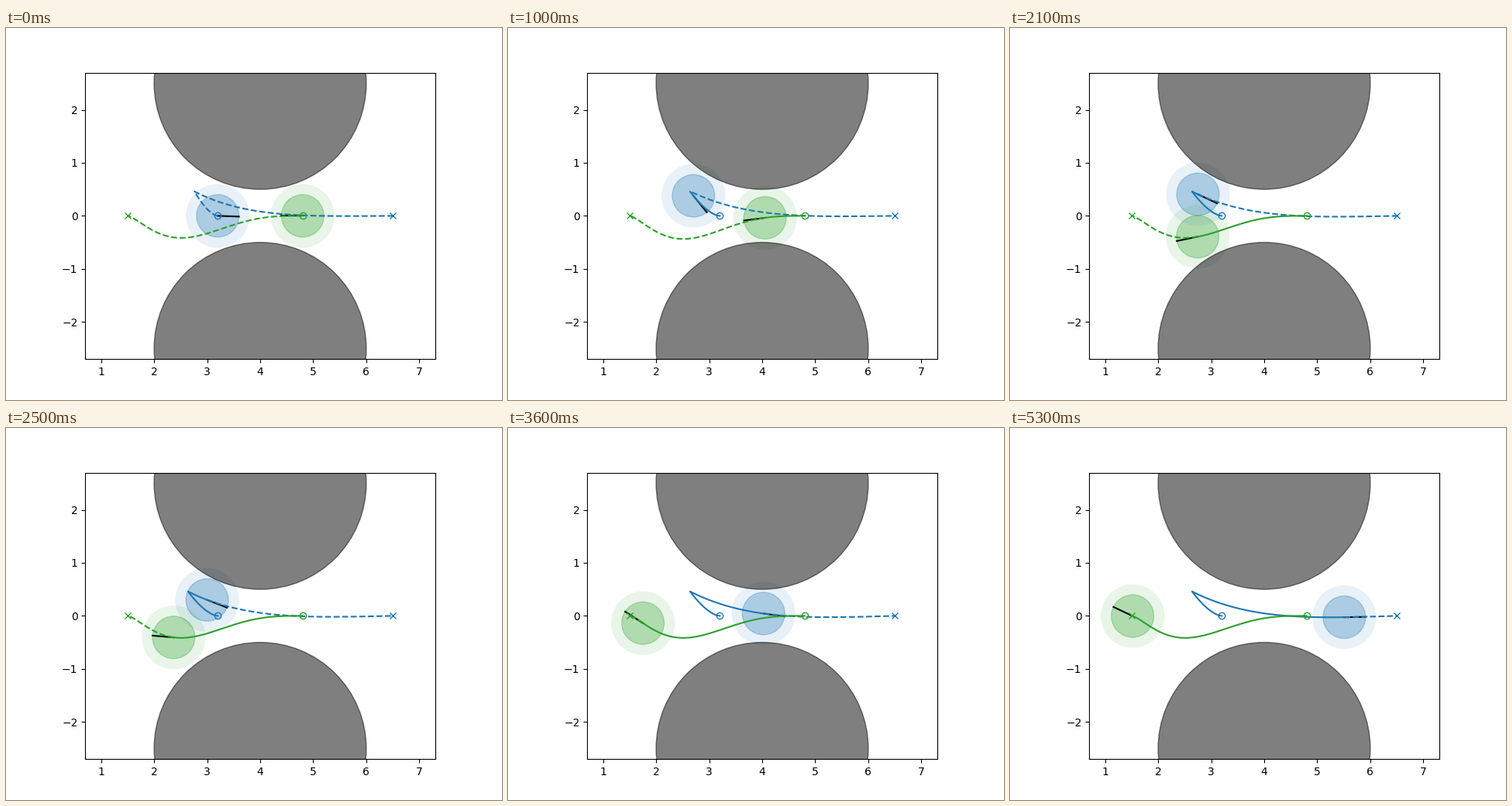
These frames come from a looping animation (640x480 px, 5.4 s). A matplotlib script:

```python
import numpy as np
import matplotlib.pyplot as plt
from matplotlib.animation import FuncAnimation
from matplotlib.patches import Circle

FRAMES, INTERVAL = 54, 100
BLUE_START, BLUE_GOAL = 3.2, 6.5
GREEN_START, GREEN_GOAL = 4.8, 1.5
CUSP_X, CUSP_Y = 2.64, 0.46
TURN = 17  # frame at which blue stops reversing
SAG = 0.038


def drive(n, a, b, scale, power):
    """Speed up from a, then settle slowly towards b."""
    return a + (b - a) * (1 - np.exp(-(n / scale) ** power))


def pulse(n, peak, width):
    return max(0, 1 - abs(n - peak) / width)


def hump(x, start, end):
    return np.sin(np.pi * np.clip((x - start) / (end - start), 0, 1))


def back_y(x):
    u = np.clip((BLUE_START - x) / (BLUE_START - CUSP_X), 0, None)
    return CUSP_Y * u ** 1.62


def ahead_y(x, sag=SAG):
    v = (BLUE_GOAL - x) / (BLUE_GOAL - CUSP_X)
    return CUSP_Y * v ** 4 - sag * np.sin(np.pi * v)


def green_y(x):
    u = np.clip((x - GREEN_GOAL) / (GREEN_START - GREEN_GOAL), 0, 1)
    return -8.49 * u ** 1.5 * (1 - u) ** 3.4


def slope_angle(f, x, step=0.01):
    return np.arctan2(f(x + step) - f(x - step), 2 * step)


def blue_x(n):
    if n < TURN:
        return drive(n, BLUE_START, CUSP_X, 6.5, 1.8)
    return drive(n - TURN, CUSP_X, BLUE_GOAL, 30.2, 1.75)


def blue_pose(n):
    x = blue_x(n)
    back = slope_angle(back_y, min(x, BLUE_START))
    ahead = slope_angle(ahead_y, x)
    turned = np.clip((n - TURN + 6) / 6, 0, 1)
    y = back_y(x) if n < TURN else ahead_y(x)
    return x, y, back + (ahead - back) * turned


def blue_past(n):
    x = blue_x(n)
    first = np.linspace(BLUE_START, x if n < TURN else CUSP_X, 40)
    then = np.linspace(CUSP_X, x, 60) if n >= TURN else np.array([])
    return np.r_[first, then], np.r_[back_y(first), ahead_y(then)]


def blue_plan(n):
    reverse = n < TURN
    x = np.linspace(CUSP_X if reverse else blue_x(n), BLUE_GOAL, 70)
    # Early plans sag less; one plan swerves below the oncoming robot.
    y = ahead_y(x, SAG * min(1, 0.2 + n / 50))
    y = y - 0.17 * pulse(n, 14, 3) * hump(x, 3.3, BLUE_GOAL)
    if not reverse:
        return x, y
    # The planned turning point wanders before it settles.
    dx = 0.12 * pulse(n, 0, 6) - 0.02 * pulse(n, 6, 6)
    dy = 0.02 * pulse(n, 6, 6)
    fade, ramp = np.linspace(1, 0, 70) ** 2, np.linspace(0, 1, 30)
    back = np.linspace(blue_x(n), CUSP_X, 30)
    return (np.r_[back + dx * ramp, x + dx * fade],
            np.r_[back_y(back) + dy * ramp, y + dy * fade])


def green_x(n):
    return drive(n, GREEN_START, GREEN_GOAL, 21.3, 1.8)


def green_pose(n, trail=0.1):
    x = green_x(n)
    y = green_y(x)
    return x, y, np.arctan2(y - green_y(x + trail), -trail)


def green_past(n):
    x = np.linspace(GREEN_START, green_x(n), 80)
    return x, green_y(x)


def green_plan(n):
    x = np.linspace(green_x(n), GREEN_GOAL, 80)
    return x, green_y(x) - 0.06 * pulse(n, 6, 6) * hump(x, GREEN_GOAL, 3.6) ** 2


class Robot:
    def __init__(self, ax, color, start, goal, pose, past, plan):
        self.pose, self.past, self.plan = pose, past, plan
        self.discs = [
            ax.add_patch(Circle((start, 0), 0.6, fc=color, lw=0, alpha=0.1)),
            ax.add_patch(Circle((start, 0), 0.4, color=color, alpha=0.3)),
        ]
        self.nose, = ax.plot([], [], "k-", zorder=1.9)
        self.plan_line, = ax.plot([], [], "--", color=color)
        self.past_line, = ax.plot([], [], "-", color=color)
        ax.plot(start, 0, "o", color=color, mfc="none")
        ax.plot(goal, 0, "x", color=color)

    def show(self, n):
        x, y, angle = self.pose(n)
        for disc in self.discs:
            disc.center = x, y
        self.nose.set_data([x, x + 0.4 * np.cos(angle)], [y, y + 0.4 * np.sin(angle)])
        self.past_line.set_data(*self.past(n))
        self.plan_line.set_data(*self.plan(n))
        return [*self.discs, self.nose, self.plan_line, self.past_line]


fig, ax = plt.subplots(figsize=(6.4, 4.8), dpi=100)
robots = [
    Robot(ax, "C0", BLUE_START, BLUE_GOAL, blue_pose, blue_past, blue_plan),
    Robot(ax, "C2", GREEN_START, GREEN_GOAL, green_pose, green_past, green_plan),
]
for cy in (2.5, -2.5):
    ax.add_patch(Circle((4, cy), 2, color="k", alpha=0.5))
ax.set_aspect("equal")
ax.set_xlim(0.7, 7.3)
ax.set_ylim(-2.7, 2.7)
ax.set_xticks(range(1, 8))
ax.set_yticks(range(-2, 3))


def update(n):
    return [artist for robot in robots for artist in robot.show(n)]


anim = FuncAnimation(fig, update, frames=FRAMES, interval=INTERVAL,
                     init_func=lambda: update(0), repeat=True, repeat_delay=0)
plt.show()
```
